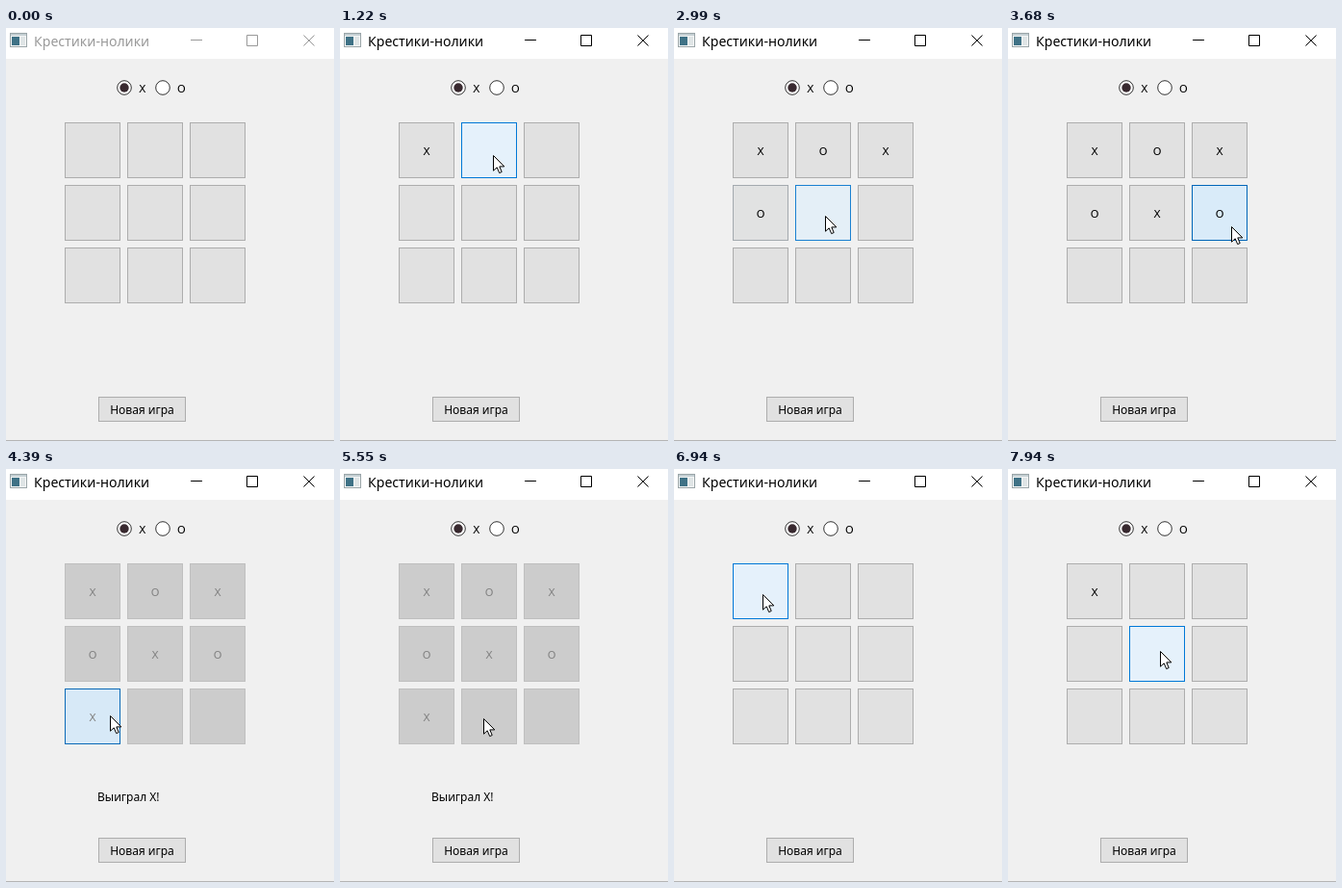
These frames come from a looping animation (341 by 429 pixels, 8 s). An HTML page:

```html
<!DOCTYPE html>
<html lang="ru">
<head>
<meta charset="utf-8">
<title>Крестики-нолики</title>
<style>
html, body { margin: 0; width: 100%; height: 100%; overflow: hidden; background: #f0f0f0; }
svg { display: block; width: 341px; height: 429px; }
text { font: 12px "Noto Sans", "Open Sans", sans-serif; fill: #000; white-space: pre; }
.caption { font-size: 14.1px; }
.mark { font: 11px "DejaVu Sans", sans-serif; }
.mid { text-anchor: middle; }
#glow { mix-blend-mode: multiply; }
</style>
</head>
<body>
<svg viewBox="0 0 341 429" xmlns="http://www.w3.org/2000/svg">
  <rect width="341" height="429" fill="#f0f0f0"/>
  <rect width="341" height="32" fill="#fff"/>
  <rect y="428" width="341" height="1" fill="#b4b4b4"/>

  <g id="icon">
    <rect x="4.5" y="5.5" width="17" height="14" fill="#f4f6f6" stroke="#9aa5a8"/>
    <rect x="5" y="6" width="16" height="2" fill="#c3ced2"/>
    <rect x="6" y="9" width="8" height="9" fill="#3f7286"/>
    <rect x="15" y="9" width="5" height="9" fill="#dfe5e6"/>
  </g>
  <text id="caption" class="caption" x="29" y="19">Крестики-нолики</text>
  <path id="controls" fill="none" d="M192 12.5H204M250.5 7.5H261.5V18.5H250.5ZM309.5 7.5L320.5 18.5M320.5 7.5L309.5 18.5"/>

  <g fill="#fff" stroke="#333">
    <circle cx="123" cy="62" r="7.3"/>
    <circle cx="163" cy="62" r="7.3"/>
  </g>
  <circle cx="123" cy="62" r="4.7" fill="#38292f"/>
  <text class="mark" x="138" y="67">X</text>
  <text class="mark" x="178" y="67">O</text>

  <g id="buttons"></g>
  <text id="result" x="95" y="345">Выиграл X!</text>

  <path id="cursor" d="M.5 .5V16.2L4.2 12.8L6.7 18.6L9.2 17.5L6.8 11.9H11.8Z" fill="#fff" stroke="#000"/>
  <circle id="glow" r="15" fill="#ffff70"/>
</svg>
<script>
const LOOP = 8000, FADE = 200, SAMPLES = 20;
const ACTIVE = 750, WIN = 4370, RESET = 6330;
// A click presses and releases this long before the pointer leaves.
const PRESS = 160, RELEASE = 60, TRAVEL = 360;

const stops = [
  [285, 415, 70], [92, 130, 910], [159, 132, 1510], [216, 150, 1990],
  [106, 202, 2770], [160, 195, 3210], [232, 206, 3700], [108, 256, 4430],
  [149, 258, 5550], [151, 396, 6390], [92, 130, 7350], [158, 189, Infinity]
].map(([x, y, leave]) => ({ x, y, leave }));

const look = {
  normal: { fill: [225, 225, 225], line: [173, 173, 173] },
  hover: { fill: [229, 241, 251], line: [0, 120, 215] },
  down: { fill: [204, 228, 247], line: [0, 84, 153] },
  off: { fill: [204, 204, 204], line: [191, 191, 191] }
};

const $ = id => document.getElementById(id);
const lerp = (a, b, k) => a + (b - a) * k;
const mix = (a, b, k) => a.map((v, i) => lerp(v, b[i], k));
const rgb = c => `rgb(${c.map(Math.round)})`;
const show = (el, on) => el.setAttribute('visibility', on ? 'visible' : 'hidden');
const isOver = t => t >= WIN && t < RESET;

function add(name, attrs) {
  const el = document.createElementNS('http://www.w3.org/2000/svg', name);
  for (const key in attrs) el.setAttribute(key, attrs[key]);
  return $('buttons').appendChild(el);
}

function makeButton(x, y, w, h, type) {
  const rect = add('rect', { x: x + .5, y: y + .5, width: w - 1, height: h - 1 });
  const label = add('text', { x: x + w / 2, y: y + h / 2 + 5, class: 'mid ' + type });
  return { x, y, w, h, rect, label };
}

const buttons = [];
for (let i = 0; i < 9; i++)
  buttons.push(makeButton(61 + i % 3 * 65, 98 + Math.floor(i / 3) * 65, 58, 58, 'mark'));
const again = buttons.push(makeButton(96, 383, 91, 26, '')) - 1;
buttons[again].label.textContent = 'Новая игра';

// Index of the enabled button under a point, or -1.
function hit({ x, y }, t) {
  const i = buttons.findIndex(b =>
    x >= b.x && x < b.x + b.w && y >= b.y && y < b.y + b.h);
  return i === again || !isOver(t) ? i : -1;
}

const clicks = stops
  .map(s => ({ down: s.leave - PRESS, up: s.leave - RELEASE, on: hit(s, s.leave - PRESS) }))
  .filter(c => c.on >= 0);
const pressed = t => clicks.find(c => t >= c.down && t < c.up);

function pointer(t) {
  if (t < stops[0].leave) return null;
  const n = stops.findIndex(s => s.leave > t);
  const a = stops[n - 1], b = stops[n];
  const k = 1 - (1 - Math.min(1, (t - a.leave) / TRAVEL)) ** 3;
  return { x: lerp(a.x, b.x, k), y: lerp(a.y, b.y, k) };
}

// The players take turns, starting with X.
function marks(t) {
  const from = t < RESET ? 0 : RESET;
  const board = Array(9).fill('');
  clicks.filter(c => c.up > from && c.up <= t)
    .forEach((c, turn) => { board[c.on] = 'XO'[turn % 2]; });
  return board;
}

// Averaging recent states yields the linear fade between button styles.
function levels(t) {
  const hover = Array(10).fill(0), down = Array(10).fill(0);
  for (let s = 0; s < SAMPLES; s++) {
    const at = t - (s + .5) * FADE / SAMPLES;
    const p = pointer(at), click = pressed(at);
    if (click) down[click.on] += 1 / SAMPLES;
    const i = p ? hit(p, at) : -1;
    if (i >= 0) hover[i] += 1 / SAMPLES;
  }
  return { hover, down };
}

function draw(t) {
  const { hover, down } = levels(t);
  const board = marks(t);
  buttons.forEach((b, i) => {
    const off = i !== again && isOver(t);
    const base = off ? look.off : look.normal;
    const shade = key =>
      rgb(mix(mix(base[key], look.hover[key], hover[i]), look.down[key], down[i]));
    b.rect.setAttribute('fill', shade('fill'));
    b.rect.setAttribute('stroke', shade('line'));
    if (i === again) return;
    b.label.textContent = board[i];
    b.label.style.fill = off ? '#838383' : '#000';
  });

  const ink = t < ACTIVE ? '#999' : '#000';
  $('caption').style.fill = ink;
  $('controls').setAttribute('stroke', ink);
  show($('result'), isOver(t));

  const p = pointer(t);
  show($('cursor'), p);
  show($('glow'), pressed(t));
  if (p) {
    const x = Math.round(p.x), y = Math.round(p.y);
    $('cursor').setAttribute('transform', `translate(${x} ${y})`);
    $('glow').setAttribute('cx', x);
    $('glow').setAttribute('cy', y);
  }
}

const start = performance.now();
function tick() {
  draw((performance.now() - start) % LOOP);
  requestAnimationFrame(tick);
}
draw(0);
requestAnimationFrame(tick);
</script>
</body>
</html>
```
